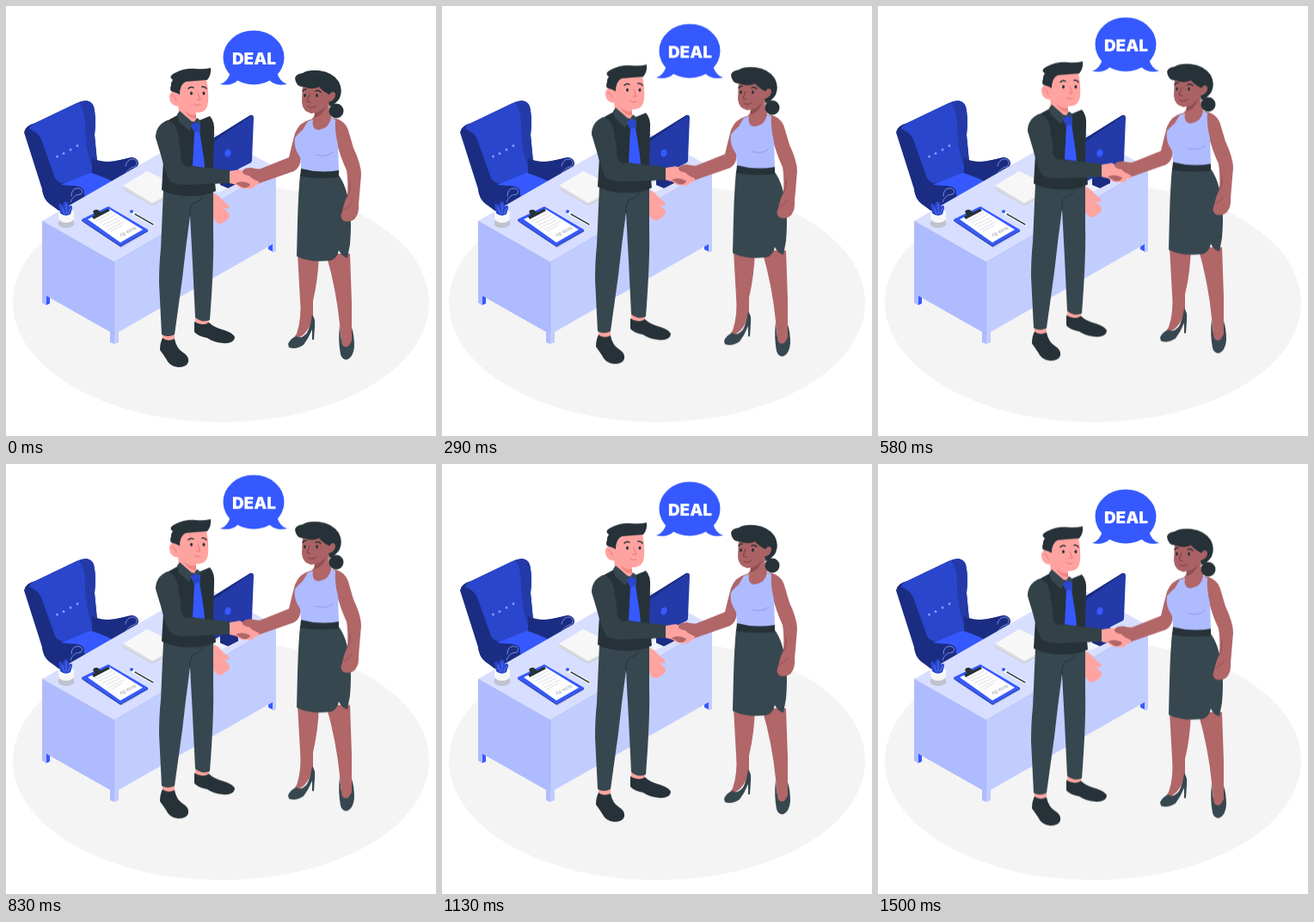
Recreate the animation shown at these times as an HTML page. Size 500x500 px, loop 1.54 s.

```html
<!DOCTYPE html>
<html lang="en">
<head>
<meta charset="utf-8">
<title>Deal</title>
<style>
html, body { margin: 0; width: 100%; height: 100%; overflow: hidden; background: #fff; }
svg { display: block; width: 100vw; height: 100vh; }
.float { animation: float 770ms linear -55ms infinite alternate; }
.people { --low: .7px; --high: -9.3px; }
.bubble { --low: 1.4px; --high: -18.9px; }
@keyframes float {
  from { transform: translateY(var(--low)); }
  to { transform: translateY(var(--high)); }
}
.ink { fill: #263238; }
.slate { fill: #37474f; }
.sleeve { fill: #334148; }
.blue { fill: #3559ff; }
.navy { fill: #1b2d82; }
.royal { fill: #2946cc; }
.cobalt { fill: #233aa8; }
.pink { fill: #ffa3a0; }
.brown { fill: #b16668; }
.umber { fill: #aa6264; }
.lilac { fill: #aebbff; }
.line { fill: none; stroke-linecap: round; stroke-linejoin: round; }
.deal { font: 900 19px Inter, sans-serif; fill: #fff; text-anchor: middle; }
.note { font: 5.5px Inter, sans-serif; fill: #9a9ea6; }
</style>
</head>
<body>
<svg viewBox="0 0 500 500">
  <ellipse cx="250" cy="345" rx="242" ry="139" fill="#f4f4f4"/>

  <g id="chair">
    <path class="navy" d="M21 147Q22 139 34 136L82 113Q98 106 102 117Q105 130 103 150L106 181Q121 182 133 179L146 176Q153 177 154 183Q153 189 146 190L132 201L90 226L64 240L52 231Q44 226 42 213Z"/>
    <path class="royal" d="M27 143Q39 147 42 158L57 200Q61 208 74 207L104 193L103 150Q105 129 102 117Q98 106 82 113L34 136Q28 138 27 143Z"/>
    <path class="cobalt" d="M85 112Q98 107 102 117Q105 130 103 150L106 181L100 188Q92 164 92 140Q92 120 85 112Z"/>
    <path class="blue" d="M64 208L98 194Q110 197 126 205L92 222Q88 210 77 209Z"/>
    <path class="navy" d="M100 177Q116 184 133 179L146 176Q154 177 154 183Q153 188 146 190L128 203Q111 197 100 194Z"/>
    <path class="navy" d="M45 202Q57 211 80 209Q91 210 91 217Q89 223 82 224L73 235L52 231Q42 224 42 211Z"/>
    <path class="line" d="M139 186Q141 177 149 178Q155 181 150 187Q144 187 139 195M76 221Q76 211 85 212Q91 214 87 219Q78 219 75 228" stroke="#8fa1f5" stroke-width=".8"/>
    <g fill="#8497ff">
      <circle cx="59.500" cy="175" r="1.500"/><circle cx="67" cy="171.500" r="1.500"/>
      <circle cx="75" cy="167" r="1.500"/><circle cx="83" cy="162.500" r="1.500"/>
    </g>
  </g>

  <g id="desk">
    <path class="blue" d="M46 335L51 338V346L46 348ZM305 276H311V286L305 283Z"/>
    <path d="M42 250L230 142L314 188L126 298Z" fill="#d8deff"/>
    <path class="lilac" d="M42 250L126 298V393L121 391V379L47 337V348L42 345Z"/>
    <path d="M126 298L314 188V285L310 287V277L131 379V391L126 393Z" fill="#c2cdff"/>
    <path class="line" d="M42 250L126 298L314 188M126 298V381" stroke="#a2aee8" stroke-width=".5"/>
  </g>

  <g id="supplies">
    <ellipse cx="70" cy="252.500" rx="9.500" ry="5.500" fill="#bfc3cf"/>
    <path d="M61 240V247Q63 252 70 252Q77 252 79 247V240Z" fill="#f7f7f7"/>
    <ellipse cx="70" cy="240.500" rx="9" ry="4.500" fill="#fff"/>
    <path class="royal" d="M63 241L61 231Q64 227 66 233L67 229Q70 225 72 229L73 233Q77 230 77 235L75 242Q69 246 63 241Z"/>
    <path class="line" d="M65 234L68 242M70 230V241M75 235L72 242" stroke="#6f87ff" stroke-width=".7"/>

    <path d="M90 252L121 236L166 262L134 281Z" fill="#a9b3df"/>
    <path class="blue" d="M88 248L119 233L165 260L133 278Z"/>
    <path class="royal" d="M88 248L133 278V280L88 250ZM133 278L165 260V262L133 280Z"/>
    <path d="M95 248L120 236L159 260L133 275Z" fill="#fff"/>
    <path class="line" d="M105 250L123 241M109 252L127 243M112 255L131 246M116 257L133 249M119 260L137 251M122 262L135 255" stroke="#dcdee3" stroke-width="1"/>
    <text class="note" transform="translate(150 256) rotate(151)">Note By</text>
    <path class="ink" d="M100 245L103 243L101 239Q103 236 107 237L110 240L119 235.500L121 238L102 248Z"/>

    <path class="line" d="M146 240L171 254" stroke="#fff" stroke-width="3.500"/>
    <path class="line" d="M150 242L171 254" stroke="#37474f" stroke-width="1.500"/>
    <circle class="blue" cx="146" cy="239" r="2"/>

    <path d="M136 210V213L170 232L204 214V211Z" fill="#c9ccd4"/>
    <path d="M136 209L164 192L204 211L170 229Z" fill="#f7f7f7"/>
    <path class="line" d="M136 211L170 230L204 212" stroke="#eee" stroke-width="1"/>

    <path d="M238 208L254 201L270 207L246 217Z" fill="#f2f4ff"/>
    <path class="navy" d="M249 194L270 182V206L258 212L249 208Z"/>
    <path class="cobalt" d="M236 157L284 127Q288 126 288 130L286 179Q286 182 283 183L236 207Z"/>
    <path class="navy" d="M236 157L284 127L286 127L238 160V206L236 207Z"/>
    <ellipse class="blue" cx="258" cy="171" rx="3.500" ry="4.700" transform="rotate(18 258 171)"/>
  </g>

  <g class="float people">
    <g id="man">
      <path class="pink" d="M239 217Q247 219 251 225L259 232Q261 235 257 236L252 234L260 242Q260 248 255 250Q249 256 244 251Q240 247 239 239Z"/>
      <path class="pink" d="M182 379H196V392H182ZM220 359H236V373H220Z"/>
      <path class="ink" d="M182 386Q188 391 196 387Q198 398 206 403Q213 407 212 414Q210 420 200 420Q190 419 186 410Q182 404 179 400Q179 392 182 386Z"/>
      <path class="ink" d="M219 367Q228 373 236 368Q242 374 254 377Q266 381 266 386Q264 393 252 392Q241 391 234 386Q223 384 219 379Z"/>
      <path class="slate" d="M183 214L241 215L241 265Q242 300 237 365Q228 369 220 362L217 300L214 244Q209 280 205 317L196 382Q188 386 181 382L178 322Q178 300 180 282Z"/>
      <path class="line" d="M214 244Q213 234 218 229M218 229Q226 228 229 221" stroke="#263238" stroke-width="1"/>
      <path class="ink" d="M201 126L220 135L237 128Q243 134 242 147L241 185L244 215Q234 221 213 221Q194 221 181 214L183 180L176 150Q178 138 190 132Z"/>
      <path class="pink" d="M200 112L221 121V135Q208 134 201 126Z"/>
      <path d="M207 121Q214 128 221 126V131Q212 131 207 121Z" fill="#ef8582"/>
      <path class="slate" d="M199 126L202 122L218 136L213 145L201 134ZM218 136L222 130L226 133L226 146Z"/>
      <path class="blue" d="M215 139L220 135L226 138L225 145L230 177L231 188L217 186L219 147Z"/>
      <path class="royal" d="M215 139L220 135L226 138L225 145L219 147Z"/>
      <path class="pink" d="M199 85Q217 79 233 86Q236 97 235 112Q234 123 224 124Q212 124 203 116Q195 118 191 111Q188 102 194 99Q198 98 200 102Z"/>
      <path class="ink" d="M195 100Q189 99 192 92Q192 88 194 86Q188 82 196 78Q207 72 221 73Q229 74 238 72Q239 80 234 86Q220 87 209 88Q202 91 202 103L198 101Z"/>
      <path class="line" d="M212 96Q215 93 218 95M228 94Q231 93 233 96" stroke="#263238" stroke-width="1.500"/>
      <ellipse class="ink" cx="215.500" cy="101.500" rx="1.500" ry="2"/>
      <ellipse class="ink" cx="230" cy="101.500" rx="1.500" ry="2"/>
      <path class="line" d="M223 101L226 109L222 109M219 114Q222 117 226 115M193 104Q196 104 198 110" stroke="#e87572" stroke-width="1"/>
      <path class="sleeve" d="M187 133Q197 134 200 149L205 182Q206 186 213 186L260 191V206L210 208Q195 208 190 203Q185 193 180 173L174 153Q174 139 187 133Z"/>
      <path class="line" d="M203 175Q204 185 212 187" stroke="#263238" stroke-width="1"/>
    </g>

    <g id="woman">
      <path class="brown" d="M339 288H364Q363 318 357 343V362Q350 386 333 388L338 381Q344 363 342 342ZM372 288H400L402 345L402 393Q398 402 391 399L388 370Q384 329 372 288Z"/>
      <path class="slate" d="M328 393Q331 386 338 384Q343 388 350 380Q354 373 356 359Q360 363 359 373L358 388H356V376Q352 386 346 394Q337 400 329 397Z"/>
      <path class="slate" d="M388 371Q389 385 391 394Q397 401 402 389V374Q405 383 405 396Q404 408 397 411Q391 412 389 405Q386 389 388 371Z"/>
      <path class="slate" d="M342 196L387 197Q396 209 400 235Q402 255 400 277L397 293Q390 291 387 284Q385 294 377 296Q354 299 338 291L339 250Q340 216 342 196Z"/>
      <path class="brown" d="M354 132Q341 135 336 148Q332 163 329 176L294 190L292 207L335 192Q341 188 342 182L349 155ZM378 130Q395 131 399 148L404 165Q413 184 413 196L410 231Q411 240 406 247Q401 252 393 250Q387 246 391 239Q393 228 397 221Q398 202 396 191Q388 174 384 156Z"/>
      <path class="line" d="M393 237Q398 235 402 229M397 221Q401 215 400 205" stroke="#8f4a4d" stroke-width=".8"/>
      <path class="brown" d="M359 116L376 107Q374 122 379 131L378 148H355L352 133Q358 132 359 124Z"/>
      <path d="M359 123L373 115Q369 127 359 130Z" fill="#8f4f52"/>
      <path class="lilac" d="M351 134L357 132Q355 144 364 144Q376 142 378 130L383 132Q382 146 386 161L387 192Q365 196 343 190L342 176Q334 165 336 153Q340 148 345 144Z"/>
      <path class="line" d="M360 173Q372 177 380 170" stroke="#8d9bea" stroke-width="1"/>
      <path class="ink" d="M343 189Q365 195 387 191V199Q364 202 342 198Z"/>
      <circle class="ink" cx="384" cy="122" r="8.500"/>
      <path class="umber" d="M345 89Q361 80 380 98Q385 101 383 107Q380 113 374 113Q368 124 355 125Q345 123 344 112Z"/>
      <path class="ink" d="M336 84Q337 79 345 78Q351 74 364 75Q380 77 387 88Q392 98 388 107Q384 114 376 117L375 112Q384 109 383 102Q380 97 376 103Q368 99 364 94Q356 98 346 94Q337 94 336 84Z"/>
      <path class="line" d="M345 99Q347 96 349 97M360 99Q363 97 366 100" stroke="#263238" stroke-width="1.500"/>
      <ellipse class="ink" cx="347.500" cy="104" rx="1.400" ry="1.900"/>
      <ellipse class="ink" cx="361.500" cy="104" rx="1.400" ry="1.900"/>
      <path class="line" d="M353 103L350 111L354 112M351 117Q356 120 360 116" stroke="#7c3d41" stroke-width="1"/>
    </g>

    <g id="handshake">
      <path class="brown" d="M275 193Q278 188 287 189L299 190L302 202L291 206L280 211Q274 209 277 202Z"/>
      <path class="pink" d="M260 192L272 190Q280 194 286 200L294 204Q295 208 289 209Q287 214 280 212Q272 213 268 208L260 206Z"/>
      <path class="brown" d="M275 194Q274 188 285 188L297 191L294 204Q287 202 283 197Q279 198 275 194Z"/>
      <path class="brown" d="M267 206Q275 202 284 207Q283 212 275 211Z"/>
    </g>
  </g>

  <g class="float bubble">
    <ellipse class="blue" cx="288" cy="60" rx="35.500" ry="31.500"/>
    <path class="blue" d="M249 91Q258 88 261 77L270 86Q262 94 249 91ZM327 91Q318 88 315 77L306 86Q314 94 327 91Z"/>
    <text class="deal" x="288.500" y="68">DEAL</text>
  </g>
</svg>
</body>
</html>
```
